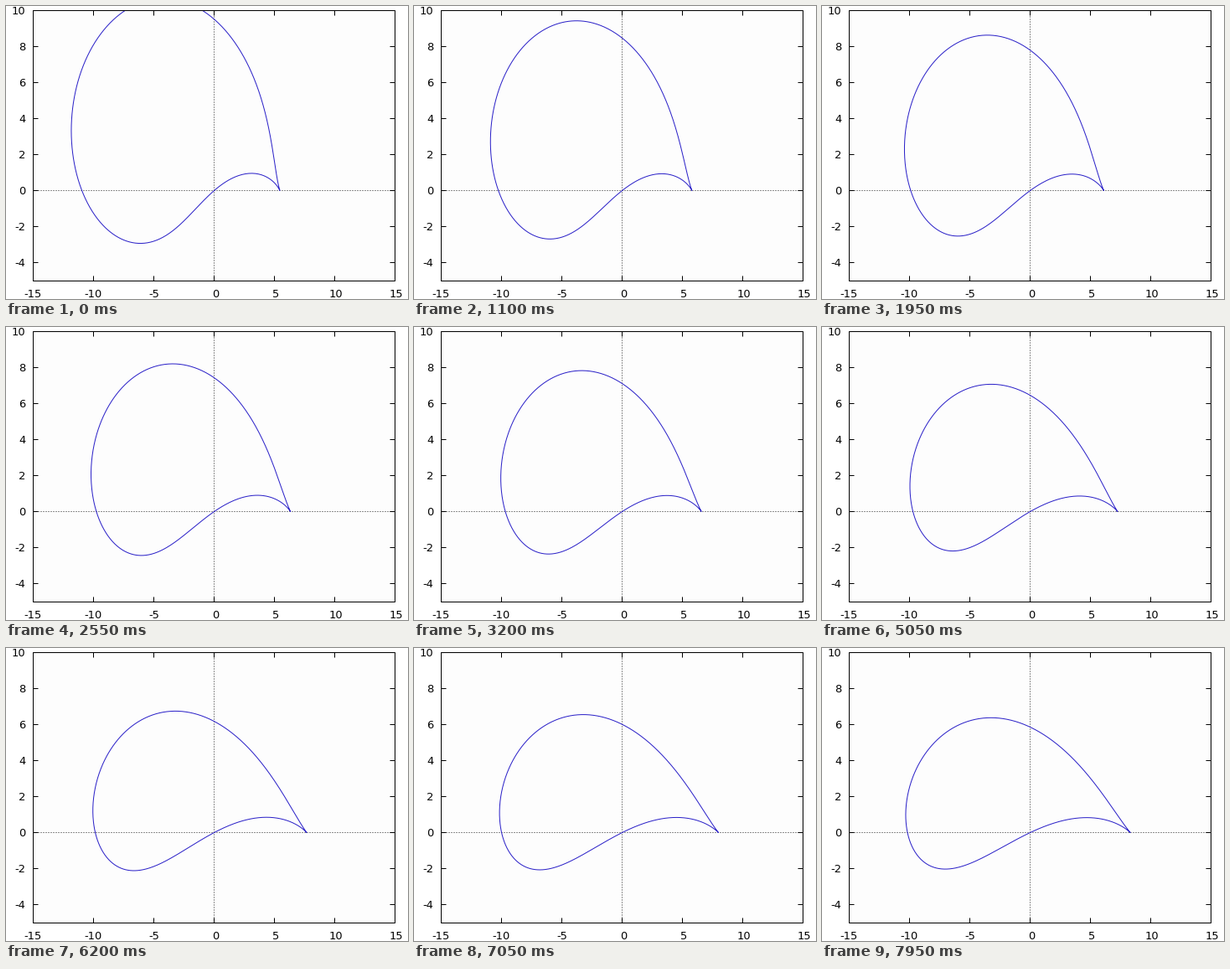
Write a matplotlib script that moves like this. It is 480 px wide and 350 px high and loops after 8 s.

```python
import numpy as np
import matplotlib.pyplot as plt
from matplotlib.animation import FuncAnimation
from matplotlib.patches import Rectangle

WIDTH, HEIGHT, DPI = 480, 350, 100
FRAMES, INTERVAL = 160, 50
LEFT, RIGHT, TOP, BOTTOM = 32.5, 464.5, 5.2, 328.2
HOLD = 4  # frames before the curve starts to move
PX = 72 / DPI  # one pixel in points

plt.rcParams["font.family"] = "DejaVu Sans"


def to_x(x):
    return LEFT + (x + 15) * (RIGHT - LEFT) / 30


def to_y(y):
    return BOTTOM - (y + 5) * (BOTTOM - TOP) / 15


def snap(v):
    """Centre of the pixel that holds v."""
    return np.floor(v + 1e-6) + 0.5


fig = plt.figure(figsize=(WIDTH / DPI, HEIGHT / DPI), dpi=DPI, facecolor="white")
ax = fig.add_axes([0, 0, 1, 1])
ax.set_xlim(0, WIDTH)
ax.set_ylim(HEIGHT, 0)
ax.axis("off")


def line(xs, ys, **style):
    style = {"color": "black", "lw": PX, "solid_capstyle": "butt",
             "snap": False, **style}
    return ax.plot(xs, ys, **style)[0]


def label(x, y, value, align):
    ax.text(x, y, str(value), fontsize=13 * PX, ha=align, va="baseline")


left, right, top, bottom = snap(np.array([LEFT, RIGHT, TOP, BOTTOM]))
box = Rectangle((left, top), right - left, bottom - top,
                facecolor="#fdfdfd", edgecolor="none", snap=False)
ax.add_patch(box)

dots = dict(color="#222222", linestyle=(0, (1, 2)), dash_capstyle="butt")
line([left, right], [snap(to_y(0))] * 2, **dots)
line([snap(to_x(0))] * 2, [bottom, top], **dots)

curve = line([], [], color="#2a20c8", zorder=3)
curve.set_clip_path(box)

line([left, right, right, left, left], [top, top, bottom, bottom, top],
     zorder=4, solid_joinstyle="miter")
for value in range(-15, 16, 5):
    x = snap(to_x(value))
    line([x, x], [bottom, bottom - 6], zorder=4)
    line([x, x], [top, top + 6], zorder=4)
    label(x + (1.5 if value >= 0 else 0), 348, value, "center")
for value in range(-4, 11, 2):
    y = snap(to_y(value))
    line([left, left + 6], [y, y], zorder=4)
    line([right, right - 6], [y, y], zorder=4)
    label(23.5, y + 4.5, value, "right")

theta = np.linspace(0, 2 * np.pi, 721)


def airfoil(c):
    """Joukowski image of the circle through c and -ic."""
    a = c / (c - 2)
    start = np.arctan2(-a, c + a)
    z = complex(-a, a) + np.hypot(c + a, a) * np.exp(1j * (theta + start))
    return z + c * c / z


def update(frame):
    step = max(frame - HOLD, 0)
    w = airfoil(2.726 + 0.00945 * step - 1.4e-6 * step ** 2)
    curve.set_data(to_x(w.real), to_y(w.imag))
    return (curve,)


anim = FuncAnimation(fig, update, frames=FRAMES, interval=INTERVAL,
                     repeat=True, repeat_delay=0, blit=False)
plt.show()
```
